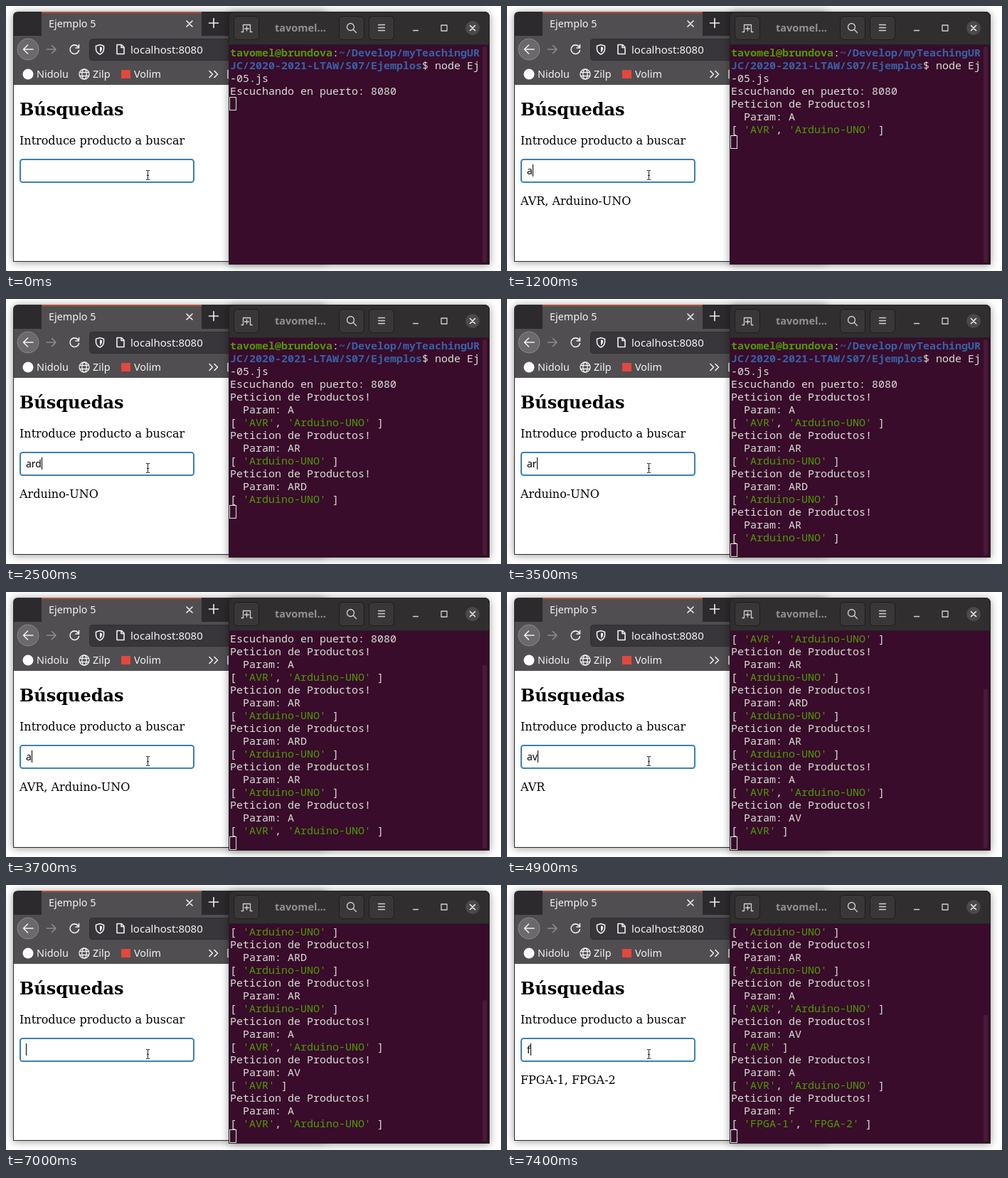
Write an HTML page that moves like this. It is 696 by 373 pixels and loops after 8 s.

```html
<!DOCTYPE html>
<html lang="es">
<head>
<meta charset="utf-8">
<title>Ejemplo 5</title>
<style>
  html, body { margin: 0; width: 100%; height: 100%; overflow: hidden; background: #fff; }
  svg { display: block; }
  text { white-space: pre; }
  .ui { font: 14.4px "Noto Sans", "Open Sans", sans-serif; fill: #f4f4f4; }
  .page { font: 16px "DejaVu Serif", serif; fill: #000; }
  .mono { font: 15px "Noto Sans Mono", monospace; fill: #dcdcd8; }
  .green { fill: #4e9a06; }
  .blue { fill: #3762a6; }
  .bold { font-weight: bold; }
  .line { fill: none; stroke: #f0f0f0; stroke-width: 1.6; stroke-linecap: round; stroke-linejoin: round; }
  .button { fill: #393738; stroke: #1e1c1d; }
  .shadow { filter: drop-shadow(0 1px 6px rgba(0, 0, 0, .4)); }
</style>
</head>
<body>
<svg width="696" height="373" viewBox="0 0 696 373">
  <!-- Browser -->
  <path class="shadow" fill="#2c2a2d" d="M10 360V15q0-7 7-7H449v352z"/>
  <path fill="#504e51" d="M11 42H50V9H275V42H449V111H11z"/>
  <path fill="#b0503c" d="M50 8H275v2H50z"/>
  <path fill="#fff" d="M11 111H449V359H11z"/>
  <text class="ui" x="60" y="30">Ejemplo 5</text>
  <path class="line" d="M254 21l8 8m0-8l-8 8M285.500 24h13m-6.500-6.500v13"/>

  <rect x="117.500" y="46.500" width="320" height="30" rx="4" fill="#38363a" stroke="#302e31"/>
  <circle cx="31" cy="61" r="15" fill="#6b696c" stroke="#8b898c"/>
  <path class="line" stroke-width="2" d="M38 61H24.500m6-6l-6 6 6 6"/>
  <path class="line" style="stroke:#8d8b8e" d="M57.500 61H70m-5.500-5.500L70 61l-5.500 5.500"/>
  <path class="line" d="M101.500 57.500a6.300 6.300 0 1 0 1 5M102.500 54.500v4.500H98"/>
  <path class="line" d="M132 54.500l5.500 1.800v4.200q0 5-5.500 7.500-5.500-2.500-5.500-7.500v-4.200z"/>
  <path fill="#f0f0f0" d="M132 57.200l3 1v2.500q0 3-3 4.700z"/>
  <path class="line" d="M156 54.500h6.500l3.500 3.500v9.500h-10zM162 54.500v4h4"/>
  <text class="ui" x="175" y="67" style="font-size:15px">localhost:8080</text>

  <circle cx="31" cy="96" r="7.500" fill="#fff"/>
  <text class="ui" x="43" y="101">Nidolu</text>
  <g class="line" style="stroke-width:1.300">
    <circle cx="110" cy="96" r="7"/>
    <ellipse cx="110" cy="96" rx="3.200" ry="7"/>
    <path d="M103.500 93.500h13m-13 5h13"/>
  </g>
  <text class="ui" x="122" y="101">Zilp</text>
  <rect x="162" y="90" width="13" height="12" fill="#e2483d"/>
  <text class="ui" x="180" y="101">Volim</text>
  <path class="line" d="M286 91.500l4.500 4.500-4.500 4.500m7-9l4.500 4.500-4.500 4.500M316 90.500h-4v11h4"/>

  <text class="page bold" x="19" y="154" style="font-size:24px">Búsquedas</text>
  <text class="page" x="19" y="195">Introduce producto a buscar</text>
  <rect x="20" y="216" width="244" height="32" rx="3.500" fill="#fff" stroke="#3b80b6" stroke-width="2"/>
  <text id="input" class="ui" x="28" y="237" style="font-size:14px;fill:#000"></text>
  <rect id="caret" y="223" width="1" height="17"/>
  <text id="result" class="page" x="19" y="280"></text>
  <g fill="none">
    <path id="beam" stroke="#fff" stroke-width="3" d="M197 231.500h2l.5.5.5-.5h2M199.500 232v12M197 244.500h2l.5-.5.5.5h2"/>
    <path stroke="#222" d="M197 231.500h2l.5.5.5-.5h2M199.500 232v12M197 244.500h2l.5-.5.5.5h2M198 238.500h3"/>
  </g>

  <!-- Terminal -->
  <path class="shadow" fill="#380c2a" d="M313 364V16q0-8 8-8H672q8 0 8 8V364z"/>
  <path fill="#302e2f" d="M313 55V16q0-8 8-8H672q8 0 8 8V55z"/>
  <path fill="#232122" d="M313 54H680v1H313z"/>
  <path fill="none" stroke="#242022" d="M313.500 364V16q0-7.500 7.500-7.500H672q7.500 0 7.500 7.500V363.500H313.500"/>
  <rect class="button" x="320.500" y="14.500" width="35" height="33" rx="5"/>
  <rect class="button" x="468.500" y="14.500" width="35" height="33" rx="5"/>
  <rect class="button" x="510.500" y="14.500" width="35" height="33" rx="5"/>
  <g class="line" style="stroke:#d4d2d0;stroke-width:1.300">
    <path d="M331 36.500h2.500v-10h10v10h2.500M338.500 29v6m-3-3h6"/>
    <circle cx="484.500" cy="29.500" r="5"/>
    <path d="M488.500 33.500l4 4M523.500 26.500h9m-9 4h9m-9 4h9M572.500 34.500h7M612 27h8v8h-8z"/>
  </g>
  <text class="ui bold" x="378" y="36" style="font-size:14.500px;fill:#93908e">tavomel...</text>
  <circle cx="656" cy="31" r="10" fill="#4b494a"/>
  <path class="line" d="M652.500 27.500l7 7m0-7l-7 7"/>
  <rect id="thumb" x="670" width="6" rx="3" fill="#481c36"/>
  <g id="rows"></g>
  <rect id="cursor" x="314.500" width="9" height="18" fill="none" stroke="#e4e4e0"/>
</svg>
<script>
const LOOP = 8000, ROWS = 17, ROW_HEIGHT = 18;
const el = id => document.getElementById(id);
const span = (cls, text) => `<tspan class="${cls}">${text}</tspan>`;

const found = {
  A: ['AVR', 'Arduino-UNO'], AR: ['Arduino-UNO'], ARD: ['Arduino-UNO'],
  AV: ['AVR'], F: ['FPGA-1', 'FPGA-2']
};
const queries = ['A', 'AR', 'ARD', 'AR', 'A', 'AV', 'A', 'F'];
const header = [
  span('green bold', 'tavomel@brundova') + ':' + span('blue bold', '~/Develop/myTeachingUR'),
  span('blue bold', 'JC/2020-2021-LTAW/S07/Ejemplos') + '$ node Ej',
  '-05.js',
  'Escuchando en puerto: 8080'
];
const answer = q => [
  'Peticion de Productos!',
  '  Param: ' + q,
  '[ ' + found[q].map(name => span('green', `'${name}'`)).join(', ') + ' ]'
];

// time, typed text, query whose result is shown, queries logged so far
const steps = [
  [0, '', '', 0],
  [1000, 'a', '', 0], [1100, 'a', '', 1], [1200, 'a', 'A', 1],
  [2200, 'ar', 'A', 2], [2300, 'ar', 'AR', 2], [2500, 'ard', 'ARD', 3],
  [3400, 'ar', 'AR', 3], [3500, 'ar', 'AR', 4], [3700, 'a', 'A', 5],
  [4900, 'av', 'AV', 6], [6400, 'a', 'AV', 7], [6500, 'a', 'A', 7],
  [6800, '', '', 7], [7400, 'f', 'F', 8]
];
const caretOff = [[0, 1000], [4600, 4900], [5800, 6400], [6800, 7000]];

function showTerminal(count) {
  const lines = [...header, ...queries.slice(0, count).flatMap(answer), ''];
  const scroll = Math.max(0, lines.length - ROWS);
  const visible = lines.slice(scroll);
  el('rows').innerHTML = visible.map((line, i) =>
    `<text class="mono" x="315" y="${71 + i * ROW_HEIGHT}">${line}</text>`).join('');
  el('cursor').setAttribute('y', 56.5 + (visible.length - 1) * ROW_HEIGHT);
  const top = 57 + 304 * scroll / lines.length;
  el('thumb').setAttribute('y', top);
  el('thumb').setAttribute('height', 361 - top);
}

let shown;
function draw(now) {
  const t = now % LOOP;
  const step = steps.findLast(s => s[0] <= t);
  if (step !== shown) {
    const [, typed, query, count] = shown = step;
    el('input').textContent = typed;
    el('result').textContent = query && found[query].join(', ');
    const width = typed && el('input').getComputedTextLength();
    el('caret').setAttribute('x', Math.round(28 + Number(width)));
    showTerminal(count);
  }
  const off = caretOff.some(([from, to]) => t >= from && t < to);
  el('caret').setAttribute('visibility', off ? 'hidden' : 'visible');
}

const start = performance.now();
(function frame() {
  draw(performance.now() - start);
  requestAnimationFrame(frame);
})();
</script>
</body>
</html>
```
